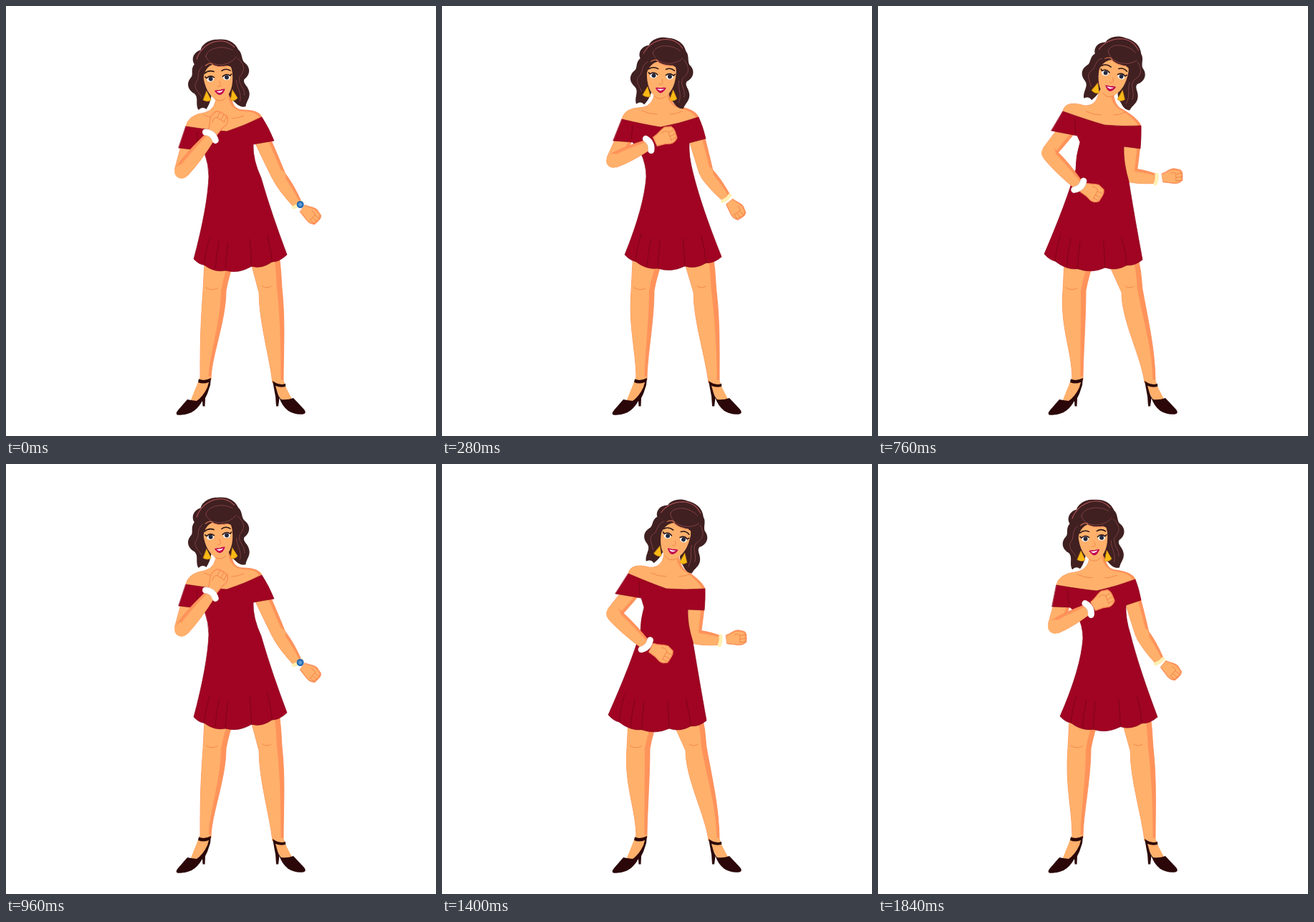
An HTML page that plays this animation: 600 by 600 pixels, repeating every 1.92 s.

```html
<!DOCTYPE html>
<html lang="en">
<head>
<meta charset="utf-8">
<title>Dancer</title>
<style>
  html, body { margin: 0; width: 100%; height: 100%; overflow: hidden; background: #fff; }
  svg { display: block; width: 100%; height: 100%; }
  path { stroke-linejoin: round; stroke-linecap: round; }
  .skin { fill: #ffb06b; }
  .shade { fill: #ff935a; stroke: #f98a55; stroke-width: .8; }
  .dark { fill: #2b0709; }
  .hair { fill: #402021; }
  .line { fill: none; stroke: #ee8148; stroke-width: .8; }
  .lock { fill: none; stroke: #8a4648; stroke-width: .8; }
  .ink { fill: none; stroke: #2a1416; stroke-width: 1.6; }
  .gold { fill: #f9b915; stroke: #d68a10; stroke-width: .6; }
  .fold { fill: none; stroke: #770519; stroke-width: .8; }
</style>
</head>
<body>
<svg viewBox="0 0 600 600">
  <path id="upperRShade" class="shade"/><path id="foreRShade" class="shade"/>
  <path id="upperR" class="skin"/><path id="foreR" class="skin"/>
  <circle id="elbowR" class="skin" r="9.5"/>
  <g id="handR">
    <path class="shade" d="M-14,-6 C-8,-7 -4,-11 3,-11 L12,-8 Q15,-5 14,0 L13,7 Q8,11 2,10 L-6,8 L-14,6Z"/>
    <path class="skin" d="M-14,-5 C-8,-6 -4,-9 3,-9 L10,-7 Q13,-4 12,0 L11,6 Q7,10 2,9 L-6,7 L-14,5Z"/>
    <path class="line" d="M13,-3 L5,-3 M13,2 L5,2 M11,7 L4,6 M-2,-5 Q5,-6 5,-3 L4,7"/>
  </g>
  <g id="band">
    <path d="M0,-6 Q2,0 0,7" fill="none" stroke="#fff0b4" stroke-width="5"/>
    <g id="watch"><circle cx="2" cy="-3" r="5" fill="#2468ad"/><circle cx="2" cy="-3" r="2.6" fill="#5b9ad6"/></g>
  </g>

  <path id="legLShade" class="shade"/><path id="legL" class="skin"/>
  <path id="legRShade" class="shade"/><path id="legR" class="skin"/>
  <path id="knees" class="line"/>
  <path class="skin" d="M271,517 L286,517 L283,534 L268,553 L257,552Z M372,520 L387,522 L392,535 L400,550 L384,550 L376,535Z"/>
  <path class="dark" d="M269,520.5 Q277,524 286,519 L285,529 L281,541 L278,547 L277.5,558.5 L274.5,558.5 L274,551 Q268,562 259,567 Q247,572 239,570.5 Q236,569 240,564 L253,549 Q260,550 266,551 Q275,545 281,532 L283,525 Q275,528 268,525Z"/>
  <path class="dark" d="M372,523 Q381,530 390,527 L390,531 Q383,533 376,530 L378,537 Q380,545 384,549 Q393,550 401,547 L416,563 Q420,568 415,569.5 Q404,571 394,565 Q385,558 381.5,547 L380,558.5 L377,558.5 L376,545 Z"/>

  <path id="upperLShade" class="shade"/><path id="upperL" class="skin"/>
  <path id="torsoShade" class="shade"/><path id="torso" class="skin"/><path id="collar" class="line"/>
  <path id="dress" fill="#a00422" stroke="#8b041d" stroke-width=".7"/>
  <path id="folds" class="fold"/>

  <g id="head">
    <path class="hair" d="M5,-53 C-8,-55 -19,-47 -20,-41 C-31,-39 -35,-29 -31,-22 C-38,-15 -33,-8 -38,-4 C-46,4 -43,13 -36,18 C-29,24 -36,33 -32,42 Q-26,37 -21,42 C-15,35 -13,28 -11,20 L12,20 C12,30 17,33 20,37 C24,42 28,45 34,44 C36,36 42,33 41,24 C40,15 33,12 36,6 C46,0 46,-10 40,-16 C34,-20 38,-30 32,-36 C28,-48 18,-53 5,-53Z"/>
    <path class="skin" d="M-20,-14 C-22,8 -16,22 -8,29 Q0,36 8,29 C17,21 22,8 20,-14 Q10,-24 -8,-22Z"/>
    <path class="line" d="M-8,29 Q0,36 8,29 M1,5 Q4,11 1,12.5 L-2,12"/>
    <path class="hair" d="M-22,5 C-20,-8 -15,-17 -6,-19 C4,-12 20,-19 20,-10 C22,-4 20,2 22,8 C32,-6 34,-26 22,-38 C8,-48 -28,-42 -29,-18Z"/>
    <path d="M-27,-29 C-22,-40 -13,-47 -2,-50 Q16,-54 27,-40" fill="none" stroke="#b5555a" stroke-width="1"/>
    <path class="lock" d="M-14,-31 C-10,-15 16,-13 28,-26 M-14,-31 C-12,-42 10,-46 24,-36 M-20,-18 C-30,-12 -25,-3 -31,3 C-37,10 -29,17 -26,24 M30,-24 C40,-13 38,-6 30,2 C26,12 36,17 34,28 M25,6 C24,18 31,22 27,36"/>
    <path d="M-16,-18.5 Q-8,-24 -5,-18 Q5,-13 15,-15" fill="none" stroke="#e98158" stroke-width="1"/>
    <g fill="#fff"><ellipse cx="-11" cy="1" rx="5" ry="3.6"/><ellipse cx="12" cy="1" rx="5" ry="3.6"/></g>
    <g fill="#25293d"><circle cx="-10.5" cy=".7" r="3"/><circle cx="12" cy=".7" r="3"/></g>
    <path class="ink" d="M-18,-3 L-16,-1 Q-11,-5.5 -5.5,-1 M6.5,-1 Q12,-5.5 17,-1 L19,-3"/>
    <path class="ink" stroke-width="1.3" d="M-18,-8 Q-12,-12.5 -5,-9 M6,-9 Q12,-12.5 18,-8"/>
    <path d="M-7,17.5 Q-3,16.5 0,17.5 Q3,16 8,16.5 Q5,24 0,24.5 Q-4,23 -7,17.5Z" fill="#c2004d"/>
    <path d="M-4.5,18.5 Q1,19.5 5.5,17.8 Q3,21 0,21 Q-3,21 -4.5,18.5Z" fill="#fff"/>
    <path class="gold" d="M-18,17 L-13,30 Q-18,33 -24,29Z M18,19 L24,31 Q19,36 14,33Z"/>
  </g>

  <path id="foreLShade" class="shade"/><path id="foreL" class="skin"/>
  <circle id="elbowL" class="skin" r="10"/>
  <g id="handL">
    <path class="shade" d="M-17,-7 C-9,-8 -4,-12 3,-13 L12,-10 Q15,-6 14,0 L13,8 Q8,13 2,12 L-6,9 L-17,7Z"/>
    <path class="skin" d="M-17,-6 C-9,-7 -4,-11 3,-12 L11,-9 Q14,-5 13,0 L12,7 Q7,12 2,11 L-6,8 L-17,6Z"/>
    <path class="line" d="M13,-4 L5,-4 M13,2 L5,2 M12,7 L4,7 M-4,-7 Q4,-9 5,-4 L4,8"/>
  </g>
  <g id="bangle" fill="none">
    <path d="M-1,-9 Q5,0 -1,9" stroke="#dcd6d6" stroke-width="9"/>
    <path d="M-1,-9 Q5,0 -1,9" stroke="#fff" stroke-width="8"/>
  </g>
</svg>
<script>
const LOOP = 1920, BEAT = 960;

// Order of values in each pose; all are points except those in SCALARS.
const KEYS = ["head", "tilt", "neckL", "dip", "neckR", "slvL", "pitL", "side", "waistL", "hemL",
  "hemR", "waistR", "pitR", "slvR", "neck", "elbowL", "wristL", "handL",
  "elbowR", "wristR", "handR", "kneeL", "kneeR", "watch"];
const SCALARS = ["tilt", "kneeL", "kneeR", "watch"];

const P = {
  chin: [296,100,-6, 251,168, 308,175, 357,155, 241,198, 268,201, 277,205, 283,238, 262,353,
    392,347, 356,240, 345,193, 374,188, 304,142, 245,231, 286,181, 296,162,
    381,238, 407,277, 425,291, 275, 353, 1],
  raise: [281,95,-3, 241,160, 298,165, 343,139, 234,190, 263,191, 268,195, 277,220, 258,347,
    390,345, 354,232, 338,181, 366,170, 296,136, 238,221, 215,167, 209,140,
    378,213, 415,259, 435,269, 269, 347, 1],
  fist: [306,97,4, 251,158, 305,169, 358,155, 239,188, 266,190, 277,204, 285,238, 255,347,
    390,350, 350,232, 345,191, 368,185, 307,136, 239,216, 289,193, 313,182,
    369,233, 397,268, 410,284, 264, 351, 0],
  lean: [325.5,102,13, 260,153, 313,174, 367,174, 242,181, 278,187, 282,200, 277,234, 232,350,
    369,358, 350,248, 343,203, 366,204, 320,142, 239,209, 285,253, 307,264,
    351,241, 388,246, 411,243, 258, 340, 0],
  swing: [334.5,94,2, 276,145, 330,167, 378,164, 252,170, 288,185, 290,187, 276,230, 235,351,
    368,352, 346,245, 358,198, 383,195, 333,137, 237,198, 229,257, 231,280,
    374,230, 414,215, 432,203, 253, 336, 0],
  back: [328,95,13, 258,147, 316,166, 367,167, 242,174, 278,181, 282,190, 276,228, 232,346,
    369,354, 350,245, 343,196, 366,199, 318,137, 238,205, 281,251, 300,260,
    351,236, 388,241, 411,238, 258, 340, 0],
  settle: [300,103,-4, 249,169, 305,177, 359,161, 243,199, 268,200, 277,208, 286,243, 254,352,
    390,353, 352,237, 346,197, 367,190, 306,144, 247,227, 294,202, 315,190,
    369,238, 393,275, 409,288, 265, 352, 0]
};

// Start time, from pose, to pose, amount; over 1 overshoots.
const STEPS = [
  [0, "chin", "chin", 0], [80, "chin", "raise", .5], [120, "raise", "raise", 0],
  [160, "fist", "raise", 1.05], [240, "raise", "fist", .5], [280, "fist", "fist", 0],
  [440, "lean", "lean", 0], [560, "swing", "swing", 0], [600, "lean", "swing", 1.15],
  [640, "lean", "swing", 1.1], [720, "swing", "back", .5], [760, "back", "back", 0],
  [880, "settle", "settle", 0]
];

const num = (a, b, k) => a + (b - a) * k;
const mix = (a, b, k) => [num(a[0], b[0], k), num(a[1], b[1], k)];
const add = (a, x, y) => [a[0] + x, a[1] + y];
const len = (a, b) => Math.hypot(b[0] - a[0], b[1] - a[1]);
const angle = (a, b) => Math.atan2(b[1] - a[1], b[0] - a[0]) * 180 / Math.PI;
const at = (...pts) => pts.map(p => p.map(v => v.toFixed(1)).join(",")).join(" ");
const el = id => document.getElementById(id);
const put = (id, d) => el(id).setAttribute("d", d);
const place = (id, p, turn = 0) =>
  el(id).setAttribute("transform", `translate(${at(p)}) rotate(${turn.toFixed(1)})`);

for (const name in P) {
  let i = 0;
  const list = P[name], pose = {};
  for (const key of KEYS) pose[key] = SCALARS.includes(key) ? list[i++] : [list[i++], list[i++]];
  P[name] = pose;
}

function blend(a, b, k) {
  const p = {};
  for (const key of KEYS) p[key] = (SCALARS.includes(key) ? num : mix)(a[key], b[key], k);
  // Keep forearms and hands from shrinking while they turn.
  for (const s of ["L", "R"]) {
    const e = "elbow" + s, w = "wrist" + s, h = "hand" + s;
    const reach = num(len(a[e], a[w]), len(b[e], b[w]), k) / len(p[e], p[w]);
    const grip = num(len(a[w], a[h]), len(b[w], b[h]), k) / len(p[w], p[h]);
    const wrist = mix(p[e], p[w], reach);
    const hand = mix(p[w], p[h], grip);
    p[h] = add(hand, wrist[0] - p[w][0], wrist[1] - p[w][1]);
    p[w] = wrist;
  }
  return p;
}

function limb(id, a, b, ra, rm, rb) {
  const d = len(a, b), nx = -(b[1] - a[1]) / d, ny = (b[0] - a[0]) / d;
  const mid = mix(a, b, .4), off = (p, r) => add(p, nx * r, ny * r);
  const shape = k => `M${at(off(a, ra))} Q${at(off(mid, rm), off(b, rb))} ` +
    `L${at(off(b, -rb * k))} Q${at(off(mid, -rm * k), off(a, -ra * k))}`;
  put(id + "Shade", shape(1));
  put(id, shape(.62));
}

function legs(l, r) {
  const left = s => `M${l + 3},345 L${l + 47 - s},345 Q${l + 36 - s},375 ${l + 32 - s},397 ` +
    `C${l + 32 - s},440 ${286 - s * .5},490 ${286 - s * .5},522 L271,522 C271,480 ${l - 4},450 ${l},397Z`;
  const lean = 353 - r;
  const right = s => `M${r - 13 - lean * .7},350 L${r + 28 - lean * .5 - s},345 ` +
    `Q${r + 31 - lean * .25 - s},370 ${r + 32 - lean * .25 - s},394 ` +
    `C${r + 37 - s},440 ${387 - s * .5},480 ${387 - s * .5},526 L372,526 C368,490 ${r},440 ${r},400Z`;
  put("legLShade", left(0));
  put("legL", left(7));
  put("legRShade", right(0));
  put("legR", right(7));
  put("knees", `M${l + 4},393 q8,5 16,1 M${r + 5},391 q6,4 12,0`);
}

function torso(p) {
  const { neckL: a, neckR: b, neck: n, dip } = p;
  const left = [num(a[0], n[0], .5), num(n[1], a[1], .3) - 1];
  const right = [num(n[0], b[0], .5), num(n[1], b[1], .3) - 1];
  const shape = s => `M${at(a)} Q${at(add(a, 3, -16), left)} Q${at(add(n, -10, 3), add(n, -10, -22))} ` +
    `L${at(add(n, 10 - s, -22))} Q${at(add(n, 10 - s, 3), add(right, 0, s * .5))} ` +
    `Q${at(add(b, -4 - s, -10 + s * .5), add(b, -s, 0))} L${at(add(dip, 0, 6))}Z`;
  put("torsoShade", shape(0));
  put("torso", shape(4));
  put("collar", `M${at(add(n, -28, 10))} q10,5 21,5 M${at(add(n, 28, 11))} q-9,4 -17,4`);
}

function dress(p) {
  const flow = (pit, waist, hem) => mix(mix(waist, hem, .45), mix(pit, waist, 2), .5);
  const hem = (f, drop) => add(mix(p.hemL, p.hemR, f), 0, drop);
  const cusps = [[1, 0], [.84, 9], [.62, 14], [.34, 18], [.11, 9], [0, 0]];
  let d = `M${at(p.neckL)} Q${at(add(mix(p.neckL, p.dip, .6), 0, 1), p.dip)} ` +
    `Q${at(add(mix(p.dip, p.neckR, .5), 0, 2), p.neckR)} ` +
    `Q${at(add(mix(p.neckR, p.slvR, .5), 1, -2), p.slvR)} L${at(p.pitR)} ` +
    `Q${at([p.pitR[0] - 1, num(p.pitR[1], p.waistR[1], .45)], p.waistR)} ` +
    `Q${at(flow(p.pitR, p.waistR, p.hemR), p.hemR)}`;
  for (let i = 1; i < cusps.length; i++) {
    const [f0, y0] = cusps[i - 1], [f1, y1] = cusps[i];
    d += ` Q${at(hem((f0 + f1) / 2, (y0 + y1) / 2 + 8 * Math.min(1, (f0 - f1) * 4)), hem(f1, y1))}`;
  }
  d += ` Q${at(flow(p.side, p.waistL, p.hemL), p.waistL)} ` +
    `Q${at([p.waistL[0], num(p.side[1], p.waistL[1], .5)], p.side)} L${at(p.pitL, p.slvL)}Z`;
  put("dress", d);

  const folds = [...cusps.slice(1, 5), [.23, 15]].map(([f, y]) =>
    `M${at(hem(f, y))} q${(.5 - f) * 4},-18 ${(.5 - f) * 20},-38`);
  folds.push(`M${at(add(p.pitL, -2, -4))} L${at(add(mix(p.neckL, p.dip, .28), 0, 6))}`);
  put("folds", folds.join(""));
}

function arm(p, s, sizes) {
  const [top, bulge, elbow, wrist] = sizes;
  const e = p["elbow" + s], w = p["wrist" + s], h = p["hand" + s];
  const shoulder = mix(mix(p["slv" + s], p["pit" + s], .5), e, -.2);
  limb("upper" + s, shoulder, e, top, top, elbow);
  limb("fore" + s, e, w, elbow, bulge, wrist);
  place("elbow" + s, e);
  place("hand" + s, h, angle(w, h));
  place(s === "L" ? "bangle" : "band", w, angle(e, w));
}

function draw(p) {
  arm(p, "L", [11, 12, 10, 7]);
  arm(p, "R", [11, 11, 9.5, 6.5]);
  el("watch").style.display = p.watch > .5 ? "" : "none";
  legs(p.kneeL, p.kneeR);
  torso(p);
  dress(p);
  place("head", p.head, p.tilt);
}

const start = performance.now();
let shown;
function tick() {
  const t = (Math.max(0, performance.now() - start) % LOOP) % BEAT;
  const step = STEPS.findLast(s => s[0] <= t);
  if (step !== shown) {
    draw(blend(P[step[1]], P[step[2]], step[3]));
    shown = step;
  }
  requestAnimationFrame(tick);
}
tick();
</script>
</body>
</html>
```
